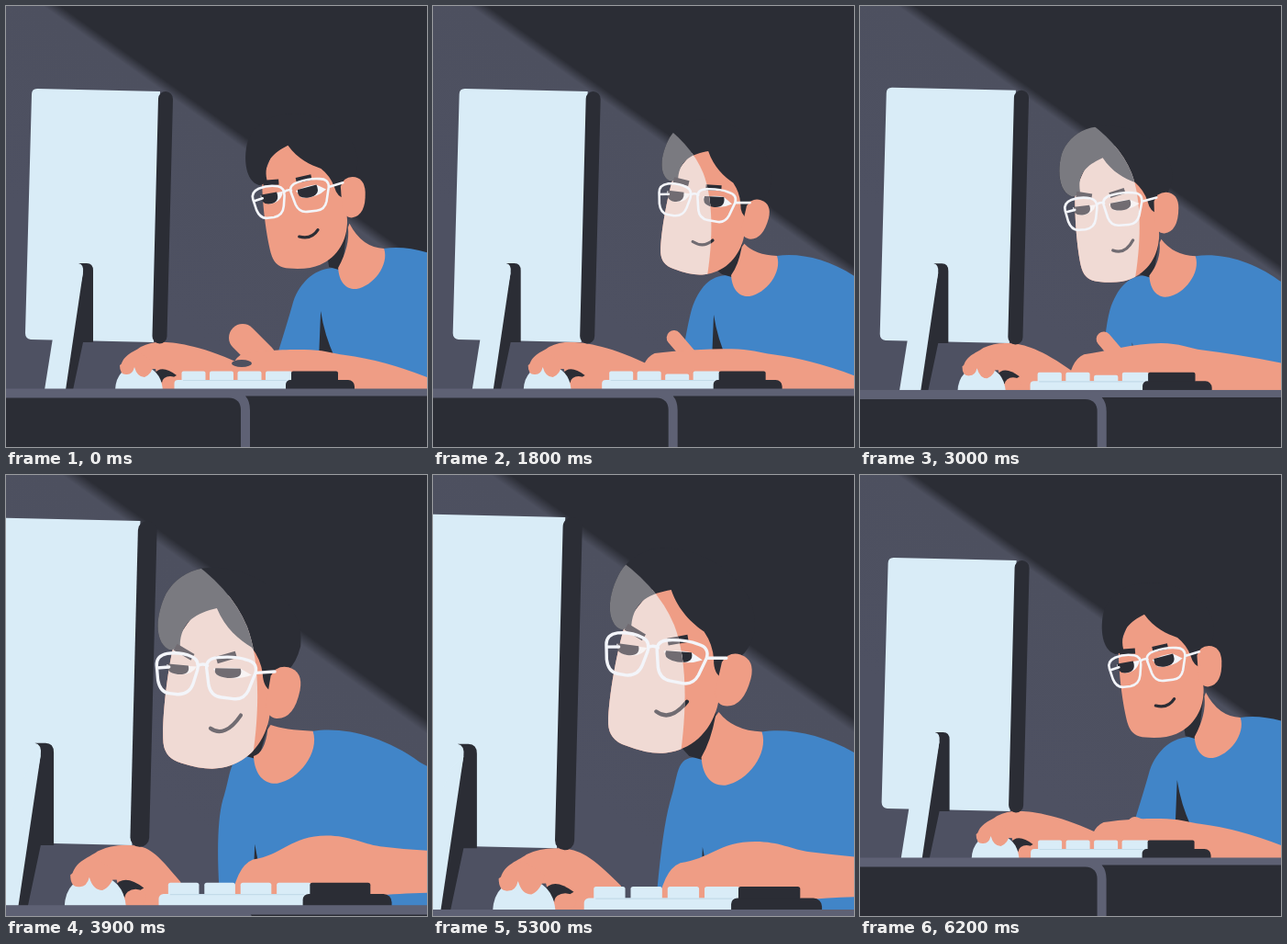
These frames come from a looping animation (459 by 480 pixels, 6.3 s). An HTML page with a canvas:

```html
<!DOCTYPE html>
<html lang="en">
<head>
<meta charset="utf-8">
<title>At the desk</title>
<style>
html, body { margin: 0; width: 100%; height: 100%; overflow: hidden; background: #2b2d35; }
canvas { display: block; }
</style>
</head>
<body>
<canvas id="stage" width="459" height="480"></canvas>
<script>
const ctx = document.getElementById('stage').getContext('2d');
const LOOP = 6300, STEP = 100;
const DARK = '#2b2d35', PALE = '#d9ecf7', SKIN = '#ef9d85', BLUE = '#4185c8', GREY = '#5e6174', SHADE = '#4d505f';
const PLAIN = { skin: SKIN, hair: DARK, ink: DARK, white: '#f4f6fb' };
const LIT = { skin: '#f0dad4', hair: '#7a7a80', ink: '#716c72', white: '#f8f4f4' };

// The head leads; body and arms follow from it.
const POSES = [
  { t: 0, x: 309, y: 210, tilt: -9.5, effort: 0, mouse: 119 },
  { t: 1000, x: 273, y: 220, tilt: -3, effort: 0, mouse: 82 },
  { t: 1800, x: 284, y: 214, tilt: 7.5, effort: .05, mouse: 98 },
  { t: 3000, x: 261, y: 224, tilt: -7, effort: .5, mouse: 105 },
  { t: 3900, x: 220.5, y: 223.5, tilt: 4, effort: 1, mouse: 104 },
  { t: 5300, x: 240, y: 209, tilt: 7.5, effort: .85, mouse: 108 }
];
POSES.push({ ...POSES[0], t: 6200 });

const mix = (a, b, u) => a + (b - a) * u;
function ease(t, from, to) {
  const u = Math.min(1, Math.max(0, (t - from) / (to - from)));
  return u * u * (3 - 2 * u);
}

function poseAt(t) {
  const i = Math.max(1, POSES.findIndex(p => p.t > t));
  const a = POSES[i - 1], b = POSES[i] || POSES.at(-1);
  const u = ease(t, a.t, b.t), p = {};
  for (const k in a) p[k] = mix(a[k], b[k], t >= 6200 ? 0 : u);
  if (t >= 6200) Object.assign(p, POSES.at(-1));
  p.rest = 1 - ease(t, 0, 1000) + ease(t, 5500, 6200);
  p.near = ease(t, 2900, 3900) - ease(t, 5600, 6200);
  p.zoom = 1 + p.near * (.293 + .027 * ease(t, 3900, 4500));
  p.drift = 2.6 * ease(t, 1200, 3000);
  p.raise = 1 - ease(t, 0, 400);
  p.tap = Math.max(0, Math.cos(t * Math.PI / 300)) * (1 - p.near);
  p.turn = (p.tilt + 3) * Math.PI / 180;
  p.bx = p.x + 96 - .75 * p.tilt;
  p.by = 272 - 8 * p.rest - p.near * 2;
  return p;
}

const fill = (d, color) => { ctx.fillStyle = color; ctx.fill(new Path2D(d)); };
function line(d, color, width, cap = 'round') {
  ctx.strokeStyle = color;
  ctx.lineWidth = width;
  ctx.lineCap = cap;
  ctx.lineJoin = 'round';
  ctx.stroke(new Path2D(d));
}
function oval(x, y, rx, ry, color) {
  ctx.fillStyle = color;
  ctx.beginPath();
  ctx.ellipse(x, y, rx, ry, 0, 0, 7);
  ctx.fill();
}
function box(x, y, w, h, r, color) {
  ctx.fillStyle = color;
  ctx.beginPath();
  ctx.roundRect(x, y, w, h, r);
  ctx.fill();
}
function zoomAbout(x, y, s) {
  ctx.translate(x, y);
  ctx.scale(s, s);
  ctx.translate(-x, -y);
}

function drawWall(zoom) {
  ctx.save();
  zoomAbout(248, 240, 1 + (zoom - 1) * .53);
  const nx = .578, ny = -.816, px = 248, py = 140.5;
  const g = ctx.createLinearGradient(px - nx * 200, py - ny * 200, px + nx * 20, py + ny * 20);
  g.addColorStop(0, '#4e5162');
  g.addColorStop(.885, SHADE);
  g.addColorStop(.935, DARK);
  ctx.fillStyle = g;
  ctx.fillRect(-100, -100, 700, 700);
  ctx.restore();
}

function drawMonitor() {
  fill('M34 90 L168 93 L161 366 L27 363 Q21 362 21 356 L28 96 Q28 90 34 90Z', PALE);
  line('M174 101 L167.5 359.5', DARK, 16);
  fill('M79 280 H88 Q95 280 95 288 V366 H84 L73 418 H60 L84 290 Q85 281 79 280Z', DARK);
  fill('M52 355 L74 300 L84 290 L65 418 H42Z', PALE);
}

function drawShirt({ bx, by, rest, near, effort }) {
  const sx = bx - 93 - 6 * rest + 17 * near, hem = 62 + .55 * bx;
  fill(`M${bx - 52} ${by + 21} C${bx - 72} ${by + 20} ${sx + 8} ${by + 34} ${sx} ${by + 58}
    Q${sx - 6} ${by + 80} ${hem} 402 V430 H570 V${by + 90}
    Q${bx + 128} ${by + 48} ${bx + 90} ${by + 26} C${bx + 60} ${by + 4} ${bx + 25} ${by - 4} ${bx} ${by}Z`, BLUE);
  const gx = bx - 69 + 20 * near, gy = Math.min(365, 332 + 80 * effort);
  fill(`M${gx} ${gy} Q${gx + 4} ${gy + 26} ${gx + 15} ${gy + 50} H${gx - 2}Z`, DARK);
}

function drawNeck({ bx, by, x, y, turn }) {
  const c = Math.cos(turn), s = Math.sin(turn);
  const at = (u, v) => `${x + u * c - v * s} ${y + u * s + v * c}`;
  fill(`M${at(60, 34)} L${bx - 46} ${by + 24} L${bx - 60} ${by + 20} L${at(34, 66)}Z`, DARK);
  fill(`M${at(60, 38)} Q${at(60, 58)} ${bx - 50} ${by + 21} C${bx - 49} ${by + 38} ${bx - 40} ${by + 45} ${bx - 30} ${by + 44}
    C${bx - 12} ${by + 41} ${bx + 6} ${by + 18} ${bx} ${by} Q${bx - 24} ${by - 1} ${at(62, 34)}Z`, SKIN);
}

// Head parts are drawn around the middle of the glasses at 273, 220.
function inHead({ x, y, turn }, paint) {
  ctx.save();
  ctx.translate(x, y);
  ctx.rotate(turn);
  ctx.translate(-273, -220);
  paint();
  ctx.restore();
}

function drawEye(white, pupil, cy, lid, pal) {
  ctx.save();
  zoomAbout(0, cy, 1);
  ctx.translate(0, cy * (1 - lid));
  ctx.scale(1, lid);
  fill(white, pal.white);
  fill(pupil, pal.ink);
  ctx.restore();
}
function drawBrow(x, y, turn, pal) {
  ctx.save();
  ctx.translate(x, y);
  ctx.rotate(turn);
  line('M-8.5 0 H8.5', pal.ink, 6, 'butt');
  ctx.restore();
}

function drawHead(effort, pal) {
  fill(`M246 195 C243 215 243 260 247 280 Q250 293 264 295 Q285 299 298 295
    C318 289 331 272 333 250 L335 200 L310 150 H270Z`, pal.skin);
  fill(`M241 201 C228 195 228 172 234 155 C239 143 249 134 262 130 C300 120 352 145 352 185
    Q350 200 344 206 L334 207 L333 226 Q325 224 323 212 Q320 200 311 191
    C300 186 287 178 278 162 C262 168 249 176 251 197 Q245 203 241 201Z`, pal.hair);
  fill('M330 213 Q334 203 344 204 Q357 206 356 222 Q354 247 339 248 Q331 248 329 238Z', pal.skin);
  const lid = 1 - .3 * effort, low = 2 * effort;
  drawEye('M242 213 L267 211 Q264 223 251 223 Q243 222 242 213Z',
    'M243 212 L260 211 Q263 222 252 223 Q241 223 243 212Z', 217, lid, pal);
  drawEye('M281 212 Q296 207 304 208 L314 214 Q302 223 286 220Z',
    'M283 211 L304 208 Q308 220 294 221 Q281 221 283 211Z', 215, lid, pal);
  drawBrow(255, 200 + low, .04 + effort * .38, pal);
  drawBrow(291, 200 + low, -.1 - effort * .3, pal);
  const x1 = 279 + effort * 6, x2 = 300 + effort * 9, y1 = 262 + effort;
  line(`M${x1} ${y1} Q${x1 + 13} ${y1 + 5 + effort * 2} ${x2} ${257 - effort * 8}`, pal.ink, 3.2);
}

function drawGlasses() {
  line(`M241 205 Q252 202 262 205 Q269 207 268 216 L266 227 Q264 237 254 238 H247 Q239 238 236 228 L233.5 216 Q232 208 241 205Z
    M284 203 Q298 200 308 202 Q318 203 317 212 L313 227 Q310 236 301 236 H291 Q282 236 279 227 L275.5 213 Q274 205 284 203Z
    M268 212 Q272 209 276 211 M317 212 L333 209 M234 218 L244 216`, '#f3f5fa', 2.6);
}

function clipLight(shift) {
  ctx.translate(shift, 0);
  ctx.clip(new Path2D('M0 60 L240 122 Q280 148 294 182 C304 208 306 250 297 302 L0 330Z'));
  ctx.translate(-shift, 0);
}

function drawMouseHand({ mouse: m, effort }) {
  const end = m + 152 - 54 * effort;
  fill(`M${m + 6} 396 C${m + 6} 380 ${m + 20} 377 ${m + 28} 371 Q${m + 40} 365 ${m + 56} 366
    C${m + 72} 367 ${mix(m + 56, end, .5)} 372 ${end} 397 V418 H${m + 50} L${m + 44} 395Z`, SKIN);
  fill(`M${m + 42} 401 Q${m + 50} 389 ${m + 67} 402 L${m + 52} 411Z`, DARK);
  fill(`M${m} 418 Q${m + 1} 393 ${m + 27} 391 Q${m + 50} 394 ${m + 52} 418Z`, PALE);
  fill(`M${m + 5} 391 Q${m + 5} 402 ${m + 13} 401 Q${m + 19} 401 ${m + 21} 393
    Q${m + 24} 404 ${m + 32} 404 Q${m + 40} 401 ${m + 43} 388 L${m + 25} 376Z`, SKIN);
  oval(m + 60, 410, 9, 7, SKIN);
}

function drawNearArm({ effort, near, raise, tap }) {
  const h = 247 - 22 * tap * (1 - raise) - 4 * raise;
  const elbow = 374 - 16 * effort, mid = 380 - 13 * effort, far = 404 - 32 * effort, under = 424 - 21 * near;
  const thumb = `M${h + 55 - raise * 19} 382 L${h + 50 - tap * (13 + 22 * raise)} ${380 - tap * 19}`;
  line(thumb, SKIN, 16 + 14 * raise);
  fill(`M${h - 3} 418 Q${h + 1} 384 ${h + 16} 378 C${h + 40} 375 295 ${elbow} 325 ${elbow}
    C345 ${elbow} 355 ${mid - 2} 370 ${mid} Q410 ${mid + 5} 459 ${far} L570 ${far + 20}
    V${under + 6} C430 ${under + 2} 380 ${under} 330 ${Math.min(418, under + 12)} L300 418Z`, SKIN);
  if (raise > .05) oval(h + 14, 389, 11 * raise, 4 * raise, SHADE);
}

function drawKeyboard(press) {
  for (let i = 0; i < 4; i++) box(191.5 + i * 30.5, 397.5 + (i === 2 ? press * 3 : 0), 26 + (i > 2 ? 3 : 0), 12, 2, PALE);
  box(311, 397.5, 51, 11, 2, DARK);
  box(183.5, 407, 125, 11, [4, 0, 0, 0], PALE);
  box(305, 407, 75, 11, [5, 7, 0, 0], DARK);
  line('M193 407.5 H306', '#c3dbe9', 1, 'butt');
}

function drawDesk() {
  ctx.fillStyle = GREY;
  ctx.fillRect(-100, 416.5, 700, 120);
  fill('M-100 426.5 H243 Q256 427 256 440 V540 H-100Z', DARK);
  fill('M600 424.5 H261 Q266 430 266 440 V540 H600Z', DARK);
}

function draw(t) {
  const p = poseAt(t);
  drawWall(p.zoom);
  ctx.save();
  zoomAbout(253, 240, p.zoom);
  ctx.translate(p.drift, 0);
  drawShirt(p);
  drawNeck(p);
  inHead(p, () => drawHead(p.effort, PLAIN));
  ctx.save();
  clipLight(-50 * p.rest - 36 * p.near);
  inHead(p, () => drawHead(p.effort, LIT));
  ctx.restore();
  inHead(p, drawGlasses);
  drawMouseHand(p);
  drawNearArm(p);
  drawMonitor();
  drawKeyboard(p.tap * (1 - p.raise));
  drawDesk();
  ctx.restore();
}

const start = performance.now();
function tick() {
  const t = (performance.now() - start) % LOOP;
  draw(Math.floor(t / STEP) * STEP);
  requestAnimationFrame(tick);
}
tick();
</script>
</body>
</html>
```
